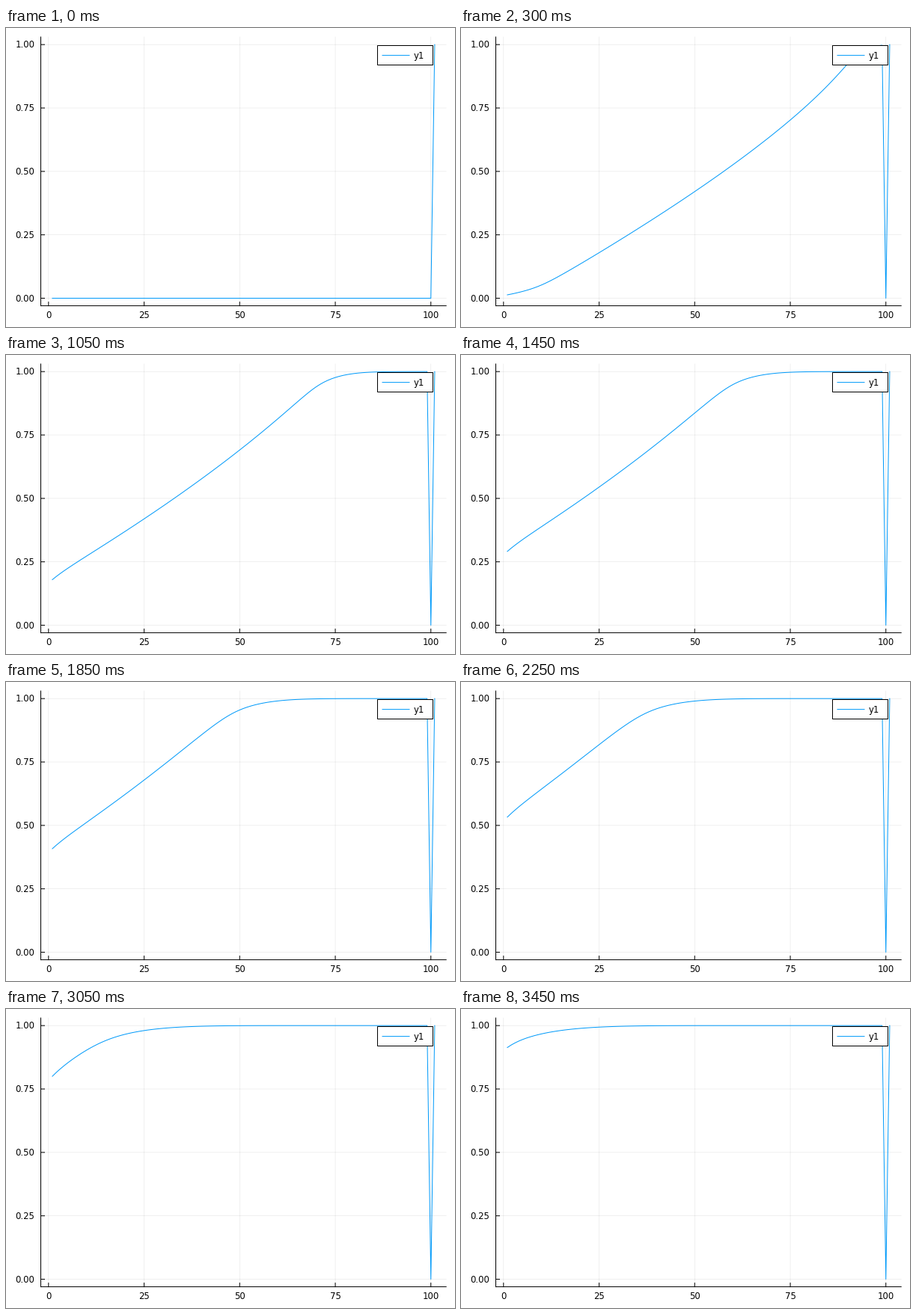
A matplotlib script that plays this animation: 600 px wide and 400 px high, repeating every 3500 ms.

```python
import numpy as np
import matplotlib.pyplot as plt
from matplotlib.animation import FuncAnimation
from matplotlib.patches import Rectangle

W, H, DPI = 600, 400, 100
FRAMES, INTERVAL = 70, 50
PX = 72 / DPI
BLUE = "#009afa"
LEFT, RIGHT, TOP, BOTTOM = 46.5, 588.2, 12, 371.6

POS = np.arange(1, 102)
ODDS = np.linspace(14, -14, 1200)   # log-odds of the plotted probability
EARLY = 12


def soft(x):
    """Smooth version of max(x, 0)."""
    return np.logaddexp(0, 3 * x) / 3


def sigmoid(z):
    return 1 / (1 + np.exp(-z))


# Each level of the curve moves left along a straight line in time.
START = 90 * sigmoid(-ODDS) ** 1.3 - 2 * soft(ODDS - 2.9) + 5 * soft(-ODDS - 3)
SPEED = 0.8 + 0.705 / (1 + np.maximum(ODDS, 0) ** 2.4 / 53)


def level_distance(step):
    """Distance of every level from the right end."""
    if step >= EARLY:
        return START + SPEED * step
    base = np.maximum(START + SPEED * EARLY, 0.5)
    return base * (step / EARLY) ** (EARLY * SPEED / base)


def curve(step):
    y = np.zeros(len(POS))
    if step:
        dist = 101 - POS + 1.2 * np.exp((1 - POS) / 3)
        y = sigmoid(np.interp(dist, level_distance(step), ODDS))
    y[-2:] = 0, 1
    return y


def px(x):
    return 46.6 + (np.asarray(x) + 2) * 541.6 / 106


def py(y):
    return 371.7 - (np.asarray(y) + 0.03) * 359.7 / 1.06


fig = plt.figure(figsize=(W / DPI, H / DPI), dpi=DPI, facecolor="white")
ax = fig.add_axes([0, 0, 1, 1])
ax.set_xlim(0, W)
ax.set_ylim(H, 0)
ax.axis("off")


def stroke(xs, ys, color="black", width=1, **kw):
    return ax.plot(xs, ys, color=color, lw=width * PX, snap=False, **kw)[0]


def label(x, y, text, ha):
    ax.text(x, y, text, ha=ha, va="baseline", fontsize=11.6 * PX,
            family="DejaVu Sans", color="black", zorder=6)


for v in (0, 25, 50, 75, 100):
    x, y = float(px(v)), float(py(v / 100))
    stroke([x, x], [TOP, BOTTOM], width=0.6, alpha=0.1, zorder=1)
    stroke([LEFT, RIGHT], [y, y], width=0.6, alpha=0.1, zorder=1)
    stroke([x, x], [BOTTOM, BOTTOM - 5], zorder=2)
    stroke([LEFT, LEFT + 5], [y, y], zorder=2)
    label(x, 387.5, str(v), "center")
    label(38.5, y + 4.3, f"{v / 100:.2f}", "right")
stroke([LEFT, LEFT], [TOP, BOTTOM], zorder=2)
stroke([LEFT, RIGHT], [BOTTOM, BOTTOM], zorder=2)

line = stroke([], [], BLUE, zorder=3)

# Legend
ax.add_patch(Rectangle((496.5, 23.5), 74, 26, fc="white", ec="black",
                       lw=PX, snap=False, zorder=4))
stroke([503, 539], [36.6, 36.6], BLUE, zorder=5)
label(544.5, 41, "y1", "left")


def update(step):
    line.set_data(px(POS), py(curve(step)))
    return [line]


anim = FuncAnimation(fig, update, frames=FRAMES, interval=INTERVAL,
                     repeat=True, repeat_delay=0)
plt.show()
```
